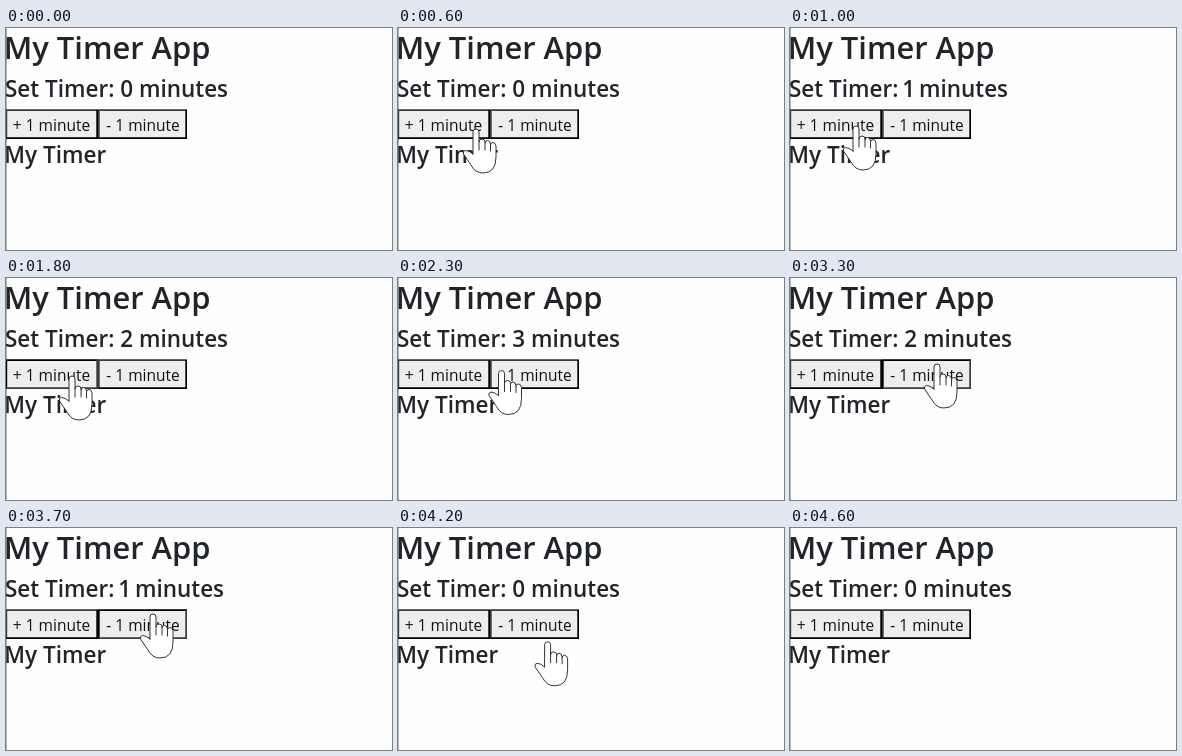
Write an HTML page that moves like this. It is 386x222 px and loops after 5000 ms.

```html
<!DOCTYPE html>
<html lang="en">
<head>
<meta charset="utf-8">
<title>My Timer App</title>
<style>
  html, body { margin: 0; width: 100%; height: 100%; overflow: hidden; background: #fefefe; }
  svg { display: block; width: 386px; height: 222px; }
  text { font-family: "Open Sans", "Noto Sans", sans-serif; fill: #212529; white-space: pre; }
  .h1 { font-size: 30.9px; font-weight: 600; }
  .h2 { font-size: 22.5px; font-weight: 600; }
  .label { font-size: 15.5px; fill: #111; }
  .edge { fill: none; stroke-width: 1.7; }
</style>
</head>
<body>
<svg viewBox="0 0 386 222">
  <path d="M.5 0V222" stroke="#b4b4b4"/>
  <text class="h1" x="-2.300" y="30.600">My Timer App</text>
  <text class="h2" x="-1" y="68.700">Set Timer: <tspan id="count">0</tspan><tspan id="unit"> minutes</tspan></text>
  <g id="buttons"></g>
  <text class="h2" x="-1.700" y="135">My Timer</text>
  <g id="hand" fill="#fff" stroke="#333" stroke-linejoin="round" stroke-linecap="round">
    <path d="M-3 25V3Q-3 0 0 0T3 3V13Q3 10 6 10T9 13V14Q9 11.500 11.500 11.500T14.500 15V16Q14.500 13.500 17 13.500T20 17V28Q20 44 7 44Q-1 44 -5 36L-12.500 25Q-13.500 22 -10.500 21.500Q-7 21.500 -3 25Z"/>
    <path d="M3 13V21M9 14V21M14.500 16V22" fill="none"/>
  </g>
</svg>
<script>
const LOOP = 5000, STEP = 100;
const $ = id => document.getElementById(id);

const buttons = [
  { x: -.5, w: 92.5, textX: 6.8, label: '+ 1 minute' },
  { x: 92, w: 89, textX: 100.3, label: '- 1 minute' }
];
const TOP = 81.2, BOTTOM = 111;

// Press times, the button pressed and the change on release
const clicks = [[900, 0, 1], [1400, 0, 1], [1800, 0, 1], [2800, 1, -1], [3300, 1, -1], [3700, 1, -1]];

// Pointer tip: time, x, y
const path = [
  [300, 124, 167], [600, 78, 101], [800, 66, 98], [2000, 66, 98],
  [2600, 141, 87], [2700, 143, 86], [2800, 147, 86], [4100, 147, 86], [4600, 160, 225]
];

$('buttons').innerHTML = buttons.map(({ x, w, textX, label }) => `<g>
  <rect x="${x}" y="${TOP}" width="${w}" height="${BOTTOM - TOP}" fill="#edeeee"/>
  <path class="edge" d="M${x + .85} ${BOTTOM}V${TOP + .85}H${x + w}"/>
  <path class="edge" d="M${x + .85} ${BOTTOM - .85}H${x + w - .85}V${TOP + .85}"/>
  <text class="label" x="${textX}" y="102.700">${label}</text></g>`).join('');
const views = [...$('buttons').children];

function pointerAt(t) {
  const i = path.findIndex(p => p[0] > t);
  if (i < 1) return null;
  const [t0, x0, y0] = path[i - 1], [t1, x1, y1] = path[i];
  const k = (t - t0) / (t1 - t0);
  return [x0 + (x1 - x0) * k, y0 + (y1 - y0) * k];
}

function draw(now) {
  const t = Math.floor(now % LOOP / STEP) * STEP;
  const tip = pointerAt(t);
  const count = clicks.reduce((n, [at, , d]) => t >= at + STEP ? n + d : n, 0);

  // The digit 1 is set narrower than the others
  $('count').textContent = count;
  for (const id of ['count', 'unit']) $(id).setAttribute('dx', count === 1 ? -2 : 0);

  $('hand').style.display = tip ? '' : 'none';
  if (tip) $('hand').setAttribute('transform', `translate(${tip})`);

  views.forEach((view, i) => {
    const [, topLeft, bottomRight] = view.children;
    const pressed = clicks.some(([at, b]) => b === i && t >= at && t < at + STEP);
    topLeft.setAttribute('stroke', pressed ? '#000' : '#3a3a3a');
    bottomRight.setAttribute('stroke', pressed ? '#3a3a3a' : '#000');
  });
}

const start = performance.now();
(function tick() {
  draw(performance.now() - start);
  requestAnimationFrame(tick);
})();
</script>
</body>
</html>
```
